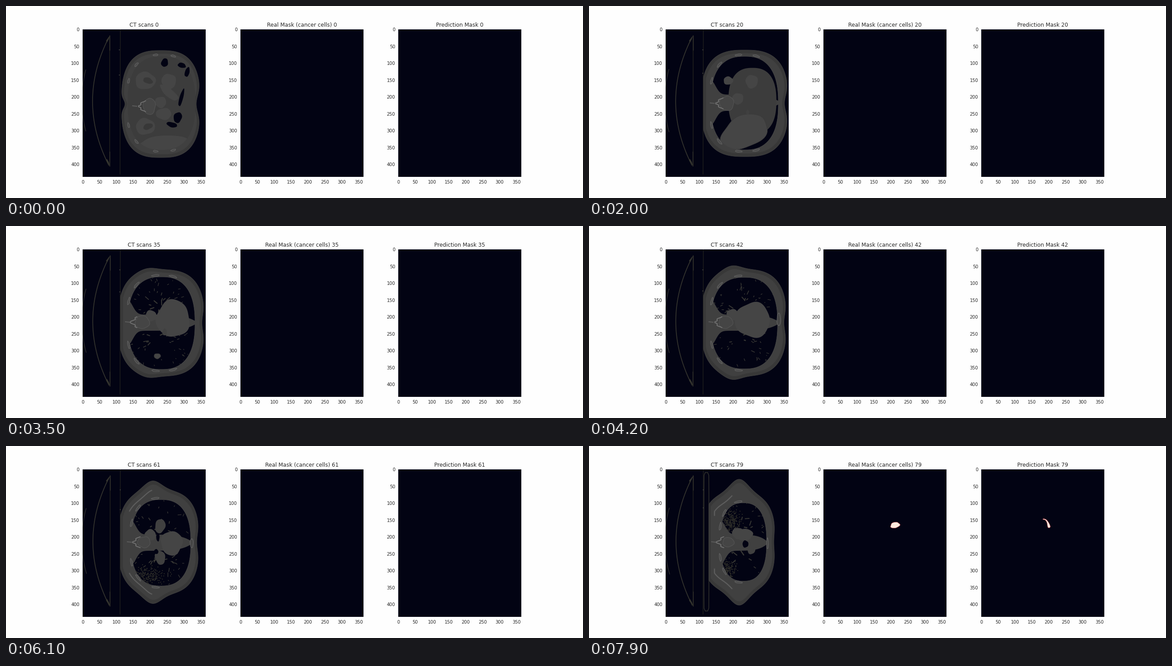
Animation of 1280x427 px, one loop 8 s. Source, as a matplotlib script:

```python
import numpy as np
import matplotlib.pyplot as plt
from matplotlib.animation import FuncAnimation
from matplotlib.collections import LineCollection
from matplotlib.patches import Polygon

W, H, DPI = 1280, 427, 64
SLICES = 80
LAST = SLICES - 1
PT = 72 / DPI  # points per stage pixel
NIGHT, FAT, MUSCLE, ORGAN = "#020313", "#383838", "#404040", "#454545"
VESSEL, HAZE, BONE = "#393935", "#272725", "#717171"
METAL, DIM = "#35352f", "#22221e"
CREAM, RIM = "#fdeade", "#a8303a"

plt.rcParams["font.family"] = "DejaVu Sans"
fig = plt.figure(figsize=(W / DPI, H / DPI), dpi=DPI, facecolor="#fefefe")


def panel(left):
    """Image panel whose coordinates are stage pixels."""
    ax = fig.add_axes([left / W, (H - 380) / H, 273 / W, 328 / H], facecolor=NIGHT)
    ax.patch.set_snap(False)
    ax.set_xlim(left, left + 273)
    ax.set_ylim(380, 52)
    xs, ys = np.arange(0, 351, 50), np.arange(0, 401, 50)
    ax.set_xticks(left + 0.3 + 0.7485 * xs, xs)
    ax.set_yticks(52.2 + 0.7495 * ys, ys)
    ax.tick_params(length=0, pad=6.9 * PT, labelsize=9.88 * PT, labelcolor="#262626")
    for spine in ax.spines.values():
        spine.set_visible(False)
    ax.set_title(" ", fontsize=11.85 * PT, color="#262626", pad=5.9 * PT)
    return ax


scan, real, pred = (panel(170 + 350.07 * i) for i in range(3))
NAMES = {scan: "CT scans", real: "Real Mask (cancer cells)", pred: "Prediction Mask"}


# ---- geometry -----------------------------------------------------------

def track(t, times, *rows):
    return [np.interp(t, times, row) for row in rows]


def life(t, mid, reach):
    """Cross-section of a rounded body through the slices: 0 to 1."""
    return np.sqrt(max(0, 1 - ((t - mid) / reach) ** 2))


def ring(left, right, cy, b, n):
    """Superellipse, one point per degree, from the left over the top."""
    a, phi = (right - left) / 2, np.radians(np.arange(360))
    c, s = np.cos(phi), np.sin(phi)
    r = (np.abs(c / a) ** n + np.abs(s / b) ** n) ** (-1 / n)
    return np.column_stack([left + a - r * c, cy - r * s])


def bump(v, mid, width):
    return np.exp(-((v - mid) / width) ** 2)


def scaled(pts, f, about):
    return about + (pts - about) * f


def oval(x, y, w, h, tilt=0, wobble=0.05):
    a = np.linspace(0, 2 * np.pi, 60, endpoint=False)
    r = 0.5 * (1 + wobble * np.sin(3 * a + x) + 0.6 * wobble * np.sin(5 * a + y))
    u, v = w * r * np.cos(a), h * r * np.sin(a)
    c, s = np.cos(np.radians(tilt)), np.sin(np.radians(tilt))
    return np.column_stack([x + u * c - v * s, y + u * s + v * c])


def body(t):
    """Skin outline: rounded box, side lobes, dents at spine and breastbone."""
    right, b, lobe, dent, cy = track(
        t, [0, 11, 28, 53, 79], [431, 442, 442, 435, 413], [119, 119, 118, 118, 110],
        [0, 0, 0, 17, 30], [9, 12, 5, 6, 3], [218, 217, 216, 214, 214])
    left = 249 + 7 * max(0, 1 - t / 11)
    x, y = ring(left, right, cy, b, 2.8).T
    middle = (left + right) / 2
    y = y + np.sign(y - cy) * lobe * bump(x, 300 + 0.42 * t, 27)
    x = x - dent * bump(y, cy, 28) * (x > middle)
    x = x + max(0, 8 - 0.3 * t) * bump(y, cy, 14) * (x < middle)
    flat = 254 + 12 * max(0, t - 61) / 18
    return np.column_stack([np.maximum(x, flat), y]), np.array([middle, cy])


def cavity(t):
    left, right, cy, b = track(t, [28, 53, 79], [270, 271, 291], [420, 417, 394],
                               [216, 216, 213.5], [104, 100, 87])
    return ring(left, right, cy, b, 2.5)


# Lung vessels: strokes spreading from each hilum, seen for a few slices.
rng = np.random.default_rng(11)


def vessels(side, n=210):
    hub = np.array([338, 215 + 32 * side])
    p = np.column_stack([rng.uniform(275, 412, n), 215 + side * rng.uniform(22, 100, n)])
    away = p - hub
    ang = np.arctan2(away[:, 1], away[:, 0]) + rng.normal(0, 0.45, n)
    near = np.exp(-np.hypot(*away.T) / 32)
    size = rng.uniform(1.5, 6, n) + 14 * near
    half = np.column_stack([np.cos(ang), np.sin(ang)]) * size[:, None] / 2
    return p, half, 0.9 + 2 * near, rng.uniform(18, 86, n)


VEINS = [vessels(side) for side in (-1, 1)]
# Hazy patches: slice, reach, centre, spread, dots.
PATCHES = [(28, 7, (396, 250), (15, 6), 190), (53, 7, (333, 294), (27, 11), 900),
           (61, 6, (312, 290), (20, 10), 260), (79, 12, (315, 166), (10, 13), 260),
           (79, 12, (306, 273), (9, 10), 190)]
# Bowel gas in the lowest slices: x, y, width, height.
GAS = [(352, 126, 15, 19), (390, 132, 18, 11), (402, 147, 10, 22),
       (389, 204, 8, 40), (381, 248, 18, 24), (368, 264, 24, 11)]

# ---- drawing ------------------------------------------------------------

live = []


def keep(artist):
    artist.set_zorder(2 + 0.01 * len(live))
    live.append(artist)
    return artist


def fill(pts, color, edge=None, lw=1.0, ax=scan):
    return keep(ax.add_patch(Polygon(pts, fc=color, ec=edge or "none", lw=lw * PT)))


def stroke(x, y, color, lw=1.0, **kw):
    return keep(scan.plot(x, y, color=color, lw=lw * PT, **kw)[0])


def blob(color, x, y, w, h, tilt=0, size=1.0, edge=None):
    if min(w, h) * size > 1:
        return fill(oval(x, y, w * size, h * size, tilt), color, edge)


def draw_table(t):
    d = t / LAST
    y = np.linspace(70, 354, 80)
    stroke(192 + d + 36 * ((y - 212) / 142) ** 2, y, METAL, 1.7)
    for a, b in ((142 - 4 * d, 180), (242, 278 + 7 * d)):
        y = np.linspace(a, b, 20)
        stroke(167.8 + 0.00198 * (y - 210) ** 2, y, METAL, 1.2)
    x = 230.3 + d
    stroke([x, x], [66, 356], DIM, 1.5)
    stroke([x, x], [66, 98], METAL, 1.4)
    stroke([x - 0.6, x - 0.6], [324, 356], METAL, 1.2)
    for end, way in ((66, 1), (355, -1)):
        fill([(222, end + 11 * way), (x, end), (228, end + 8 * way), (224, end + 15 * way)], METAL)
    stroke([253.6, 253], [52, 374], DIM, 1.3)
    for y in (97, 153 - 16 * d):
        stroke([251.3 + 1.7 * d], [y], "#55554e", marker="s", ms=1.7 * PT, mew=0)
    if t > 66:
        frame = ring(255, 254 + 12 * (t - 66) / 13, 213, 154, 14)
        fill(frame, "none", METAL, 1.4)


def draw_lungs(t, chest):
    lung = fill(chest, NIGHT, "#4a4a4a", 0.8)
    for p, half, width, when in VEINS:
        on = (np.abs(when - t) < 6) & (t > 20)
        arm = half[on] * (1 - np.abs(when[on] - t) / 7)[:, None]
        lines = LineCollection(np.stack([p[on] - arm, p[on] + arm], 1), colors=VESSEL,
                               linewidths=width[on] * PT, capstyle="round")
        keep(scan.add_collection(lines)).set_clip_path(lung)
    for mid, reach, centre, spread, n in PATCHES:
        count = int(n * (1 - abs(t - mid) / reach))
        if count > 0:
            dots = np.random.default_rng(100 + t).normal(centre, spread, (count, 2))
            keep(scan.scatter(*dots.T, s=(1.6 * PT) ** 2, marker="s", c=HAZE,
                              linewidths=0)).set_clip_path(lung)


def draw_midline(chest):
    """Tissue between the lungs: wide at the spine, thin at the breastbone."""
    left, right = chest[:, 0].min(), chest[:, 0].max()
    x = np.linspace(left - 3, right + 3, 80)
    u = np.clip((x - left) / (right - left), 0, 1)
    m = 4 + 14 * (1 - u**6) + 32 * bump(x, left, 15)
    fill(np.column_stack([np.r_[x, x[::-1]], 215 + np.r_[-m, m[::-1]]]), MUSCLE)


def draw_abdomen(t, chest):
    # The domes of the belly sink away towards the heart as the lungs open.
    f = np.interp(t, [11, 28], [1, 0.45])
    mass = fill(scaled(chest, f, np.array([405, 200])), "#3c3c3c")
    for side in (-1, 1):
        y, size = 217 + 51 * side, life(t, 4, 14 - 4 * side)
        blob(ORGAN, 309, y, 46, 40, 0, size)
        blob(FAT, 315, y, 22, 13, -20 * side, life(t, 0, 8))
    blob(ORGAN, 322, 132, 60, 25, 0, life(t, 11, 9))
    blob(ORGAN, 361, 168, 40, 44, 0, life(t, 9, 15))
    blob(ORGAN, 350, 240, 34, 26, 0, life(t, 0, 9))
    blob(ORGAN, 362, 193, 50, 18, 40, life(t, 0, 8))
    return mass


def draw_liver(t, chest):
    x, y, w, h, tilt = track(t, [0, 11, 28, 37], [352, 352, 338, 335], [307, 272, 287, 290],
                             [122, 158, 64, 0], [38, 92, 51, 0], [-4, -42, -10, 0])
    liver = blob(ORGAN, x, y, w, h, tilt, edge="#3b3b3b")
    if liver:
        liver.set_clip_path(Polygon(chest, transform=scan.transData))


def draw_gas(t):
    for x, y, w, h in GAS:
        blob(NIGHT, x, y, w, h, 15, life(t, 0, 7))
    blob(NIGHT, 397, 160, 40, 32, 0, life(t, 12, 8))


def draw_vitals(t):
    if t >= 28:
        blob(ORGAN, *track(t, [28, 42, 54, 62, 79], [378, 363, 371, 367, 343], [203, 209, 215, 216, 197],
                           [70, 78, 47, 48, 42], [88, 78, 54, 54, 26]))
    blob(ORGAN, *track(t, [0, 28, 42, 61, 79], [343, 325, 318, 320, 330],
                       [214, 203, 197, 198, 194]), 25, 25)
    blob(MUSCLE, 352, 236, 15, 24, 0, life(t, 28, 9))
    for side in (-1, 1):
        blob(MUSCLE, 342, 213 + 35 * side, 24, 34, -12 * side, life(t, 56, 14))
    blob(MUSCLE, 360, 230, 18, 21, 0, life(t, 79, 13))
    blob(NIGHT, *track(t, [61, 79], [337, 347], [203, 218], [9, 14], [22, 17]), 0, life(t, 72, 19))
    blob(NIGHT, 333, 235, 10, 11, 0, life(t, 60, 8))


def draw_bones(t, chest, skin, centre):
    mid = chest.mean(0)
    wall = scaled(chest, 1.035, mid)
    size = np.interp(t, [0, 28], [11, 17])
    for deg in (34, 57, 83) + ((104,) if t < 38 else ()):
        for d in (deg, 360 - deg):
            dx, dy = wall[d + 2] - wall[d - 2]
            fill(oval(*wall[d], size, 4.2, np.degrees(np.arctan2(dy, dx)), 0.08),
                 "#4a4a4a", "#686868", 0.9)
    if t > 46:  # shoulder blades
        inner = scaled(skin, np.interp(t, [53, 79], [0.87, 0.81]), centre)
        lo = int(np.interp(t, [46, 62], [72, 46]))
        for way in (1, -1):
            arc = inner[way * np.arange(lo, 82)]
            stroke(*arc.T, "#4d4d4d", 3.2)
            stroke(*arc.T, "#686868", 1.1)
    x, y, w, h = track(t, [0, 28, 79], [318, 301, 309], [223, 214, 214], [27, 33, 25], [36, 30, 21])
    blob(ORGAN, x, y, w, h, edge="#565656")
    s = np.linspace(0, 1, 9)
    for side in (-1, 1):
        stroke(x - 24 + 13 * s + 2.5 * np.sin(8 * s + 0.3 * t), y + side * (1 + 11 * s), BONE, 2)
    stroke([x - 37, x - 28], [y - 1, y], "#5c5c5c", 2)
    if t > 36:  # breastbone
        blob(ORGAN, *track(t, [42, 53, 61, 79], [421, 419, 412, 396], [208, 216, 216, 217],
                           [8, 9, 7, 4], [28, 30, 20, 24]), edge="#696969")


def draw_masks(t):
    if t >= 74:
        f = np.interp(t, [74, LAST], [0.5, 1])
        fill(oval(679, 176, 21 * f, 13 * f, -12, 0.06), CREAM, RIM, 0.7, real)
    if t >= 76:
        # a tail that bends down and thickens
        u = np.linspace(0, 1, 30)[:, None]
        spine = (1 - u) ** 2 * (1007, 163) + 2 * u * (1 - u) * (1017, 161) + u**2 * (1021, 182)
        spine = scaled(spine, np.interp(t, [76, LAST], [0.6, 1]), np.array([1018, 173]))
        dx, dy = np.gradient(spine, axis=0).T
        half = 1 + 3.2 * u[:, 0] ** 3 * np.sqrt(1 - u[:, 0] ** 12)
        out = np.column_stack([-dy, dx]) * (half / np.hypot(dx, dy))[:, None]
        fill(np.vstack([spine + out, (spine - out)[::-1]]), CREAM, RIM, 0.7, pred)


def draw(t):
    for artist in live:
        artist.remove()
    live.clear()
    for ax, name in NAMES.items():
        ax.title.set_text(f"{name} {t}")

    draw_table(t)
    skin, centre = body(t)
    chest = cavity(t)
    fill(skin, FAT, "#414141", 0.9)
    fill(scaled(skin, 0.94, centre), MUSCLE)
    if t > 11:
        draw_lungs(t, chest)
        draw_midline(chest)
    if t < 28:
        draw_abdomen(t, chest)
    draw_liver(t, chest)
    draw_gas(t)
    draw_vitals(t)
    draw_bones(t, chest, skin, centre)
    draw_masks(t)
    return live


anim = FuncAnimation(fig, draw, frames=SLICES, init_func=lambda: draw(0),
                     interval=100, repeat=True, repeat_delay=0, blit=False)
plt.show()
```
